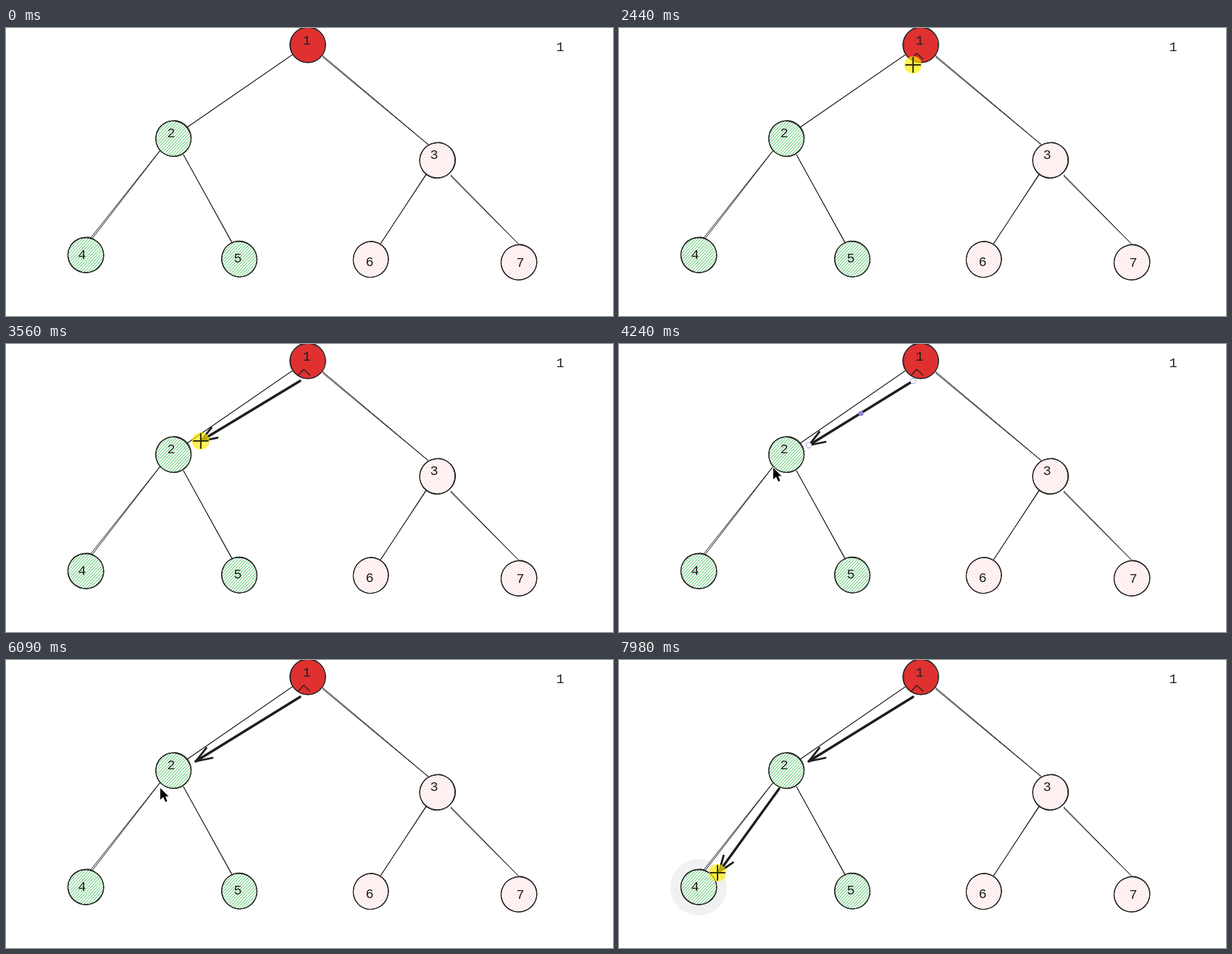
These frames come from a looping animation (838x398 px, 8 s). An HTML page with a canvas:

```html
<!DOCTYPE html>
<html lang="en">
<head>
<meta charset="utf-8">
<style>
  html, body { margin: 0; width: 100%; height: 100%; overflow: hidden; background: #fff; }
  canvas { display: block; }
</style>
</head>
<body>
<canvas width="838" height="398"></canvas>
<script>
const ctx = document.querySelector('canvas').getContext('2d');
const INK = '#1e1e1e', RED = '#e03131', GREEN = '#40c057', PINK = '#ffc9c9';
const LOOP = 8000, TAU = Math.PI * 2;

// centre x, y, fill, label x, y
const nodes = [
  [416.5, 23.5, RED, 415, 17],
  [231, 153, GREEN, 228, 145],
  [595.5, 183, PINK, 591, 175],
  [110, 314, GREEN, 105, 313],
  [322, 319.5, GREEN, 320, 318],
  [503.5, 320, PINK, 502, 323],
  [708, 324, PINK, 710, 324],
];

// x1, y1, x2, y2, gap of the second stroke at each end
const edges = [
  [395, 37, 250, 137, 0.3, 0.4],
  [437, 38, 583, 161, 2, -0.8],
  [212, 170, 117, 290, 0.5, 2],
  [245, 175, 312, 297, 0.3, 0.8],
  [580, 203, 517, 298, -1.3, 0.3],
  [614, 203, 708, 299, 1.6, 0.2],
];

// time, x, y of the pointer
const track = [
  [260, 774, 378], [400, 493, 101], [740, 405, 9], [1020, 408, 40], [1090, 409, 50],
  [1500, 409, 50], [1800, 413, 88], [2110, 406, 51], [2590, 406, 51], [3360, 282, 126],
  [3560, 269, 134], [3640, 262, 140], [3900, 214, 174], [4100, 214, 174], [4870, 208, 158],
  [5010, 202, 167], [5160, 202, 167], [5760, 213, 177], [6090, 213, 177], [6350, 221, 178],
  [7280, 221, 178], [7980, 136, 294],
];

function pointerAt(t) {
  let i = track.findIndex(k => k[0] > t);
  if (i < 0) i = track.length;
  const a = track[Math.max(0, i - 1)], b = track[Math.min(i, track.length - 1)];
  const p = b[0] > a[0] ? (t - a[0]) / (b[0] - a[0]) : 0;
  return [a[1] + (b[1] - a[1]) * p, a[2] + (b[2] - a[2]) * p];
}

function polyline(points, color, width) {
  ctx.beginPath();
  points.forEach(p => ctx.lineTo(...p));
  ctx.strokeStyle = color;
  ctx.lineWidth = width;
  ctx.stroke();
}

function disc(x, y, r, color) {
  ctx.beginPath();
  ctx.arc(x, y, r, 0, TAU);
  ctx.fillStyle = color;
  ctx.fill();
}

function drawEdge([x1, y1, x2, y2, g1, g2]) {
  polyline([[x1, y1], [x2, y2]], INK, 1);
  polyline([[x1, y1 + g1], [x2 + g2, y2 + g2 / 2]], INK, 1);
}

function drawNode([x, y, fill, lx, ly], i) {
  if (fill === RED) {
    disc(x, y, 24, RED);
  } else {
    ctx.save();
    ctx.beginPath();
    ctx.arc(x, y, 24, 0, TAU);
    ctx.clip();
    ctx.translate(x, y);
    ctx.rotate(-41 * Math.PI / 180 - 0.12);
    for (let d = -25; d < 26; d += 3) polyline([[-25, d], [25, d + 0.5]], fill, 0.9);
    ctx.restore();
  }
  ctx.strokeStyle = INK;
  ctx.lineWidth = 1.1;
  ctx.beginPath();
  ctx.ellipse(x, y, 24.7, 24.1, i, 0, TAU);
  ctx.stroke();
  ctx.beginPath();
  ctx.ellipse(x + 0.3, y - 0.3, 24.2, 24.8, i * 0.7, 0, TAU);
  ctx.stroke();
  if (i) polyline([[x - 3, y - 24.5], [x + 4, y - 25], [x + 11, y - 22.5]], INK, 1);
  label(i + 1, lx, ly);
}

function label(text, x, y) {
  ctx.font = '18.5px "Liberation Mono", monospace';
  ctx.textAlign = 'center';
  ctx.fillStyle = INK;
  ctx.fillText(text, x, y + 6);
}

function drawHalo(i) {
  ctx.beginPath();
  ctx.arc(nodes[i][0], nodes[i][1], 32, 0, TAU);
  ctx.strokeStyle = '#f1f1f1';
  ctx.lineWidth = 14;
  ctx.stroke();
}

function drawArrow(x1, y1, x2, y2) {
  const back = Math.atan2(y1 - y2, x1 - x2);
  const size = Math.min(23.5, Math.hypot(x1 - x2, y1 - y2) / 2);
  const barb = turn => [x2 + size * Math.cos(back + turn), y2 + size * Math.sin(back + turn)];
  polyline([[x1, y1], [x2, y2]], INK, 3.4);
  polyline([barb(0.35), [x2, y2], barb(-0.35)], INK, 2.8);
}

function drawHandles() {
  for (const [x, y] of [[406, 51], [262, 140]]) {
    disc(x, y, 4.2, '#a9a4e6');
    disc(x, y, 3.2, '#fff');
  }
  disc(334, 96, 3.5, '#8c86d6');
}

function shape(points, x, y) {
  ctx.beginPath();
  points.forEach(([px, py]) => ctx.lineTo(x + px, y + py));
  ctx.closePath();
  ctx.strokeStyle = '#fff';
  ctx.lineWidth = 2;
  ctx.stroke();
  ctx.fillStyle = '#000';
  ctx.fill();
}

const cursors = {
  arrow(x, y) {
    shape([[0, 0], [0, 16], [4, 12.5], [7, 19], [9.5, 18], [7, 11.5], [11.5, 11.5]], x, y);
  },
  move(x, y) {
    const quarter = [[1.3, -1.3], [1.3, -5.5], [4, -5.5], [0, -10], [-4, -5.5], [-1.3, -5.5]];
    const points = [];
    for (let q = 0; q < 4; q++) {
      const c = [1, 0, -1, 0][q], s = [0, -1, 0, 1][q];
      quarter.forEach(([a, b]) => points.push([a * c - b * s, a * s + b * c]));
    }
    shape(points, x, y);
  },
  cross(x, y) {
    polyline([[x - 10, y], [x + 10, y]], '#332f0c', 2);
    polyline([[x, y - 10], [x, y + 10]], '#332f0c', 2);
  },
};

function cursorKind(t) {
  if (t < 260 || (t >= 470 && t < 740)) return null;
  if (t < 1090) return 'arrow';
  if (t < 1640) return 'move';
  if (t < 4100) return 'cross';
  return t < 6220 ? 'arrow' : 'cross';
}

function draw(t) {
  const within = (a, b) => t >= a && t < b;
  const [x, y] = pointerAt(t);
  ctx.fillStyle = '#fff';
  ctx.fillRect(0, 0, 838, 398);
  ctx.lineCap = ctx.lineJoin = 'round';

  if (within(1960, 2440)) drawHalo(0);
  if (within(3640, 4100) || within(6810, 7560)) drawHalo(1);
  if (t >= 7840) drawHalo(3);

  edges.forEach(drawEdge);
  nodes.forEach(drawNode);
  label(1, 765, 26);
  if (t >= 1090) polyline([[404, 42.5], [411, 35], [419.5, 43]], '#3a2020', 1.6);

  if (t >= 2590) drawArrow(406, 51, ...pointerAt(Math.min(t, 3640)));
  if (t > 7300) drawArrow(221, 178, x + 2, y - 1);
  if (within(4100, 5460)) drawHandles();

  if (within(2440, 4100) || t >= 6810) disc(x, y, 12, 'rgba(255, 236, 0, 0.68)');
  const kind = cursorKind(t);
  if (kind) cursors[kind](x, y);
}

function tick() {
  draw(performance.now() % LOOP);
  requestAnimationFrame(tick);
}
tick();
</script>
</body>
</html>
```
